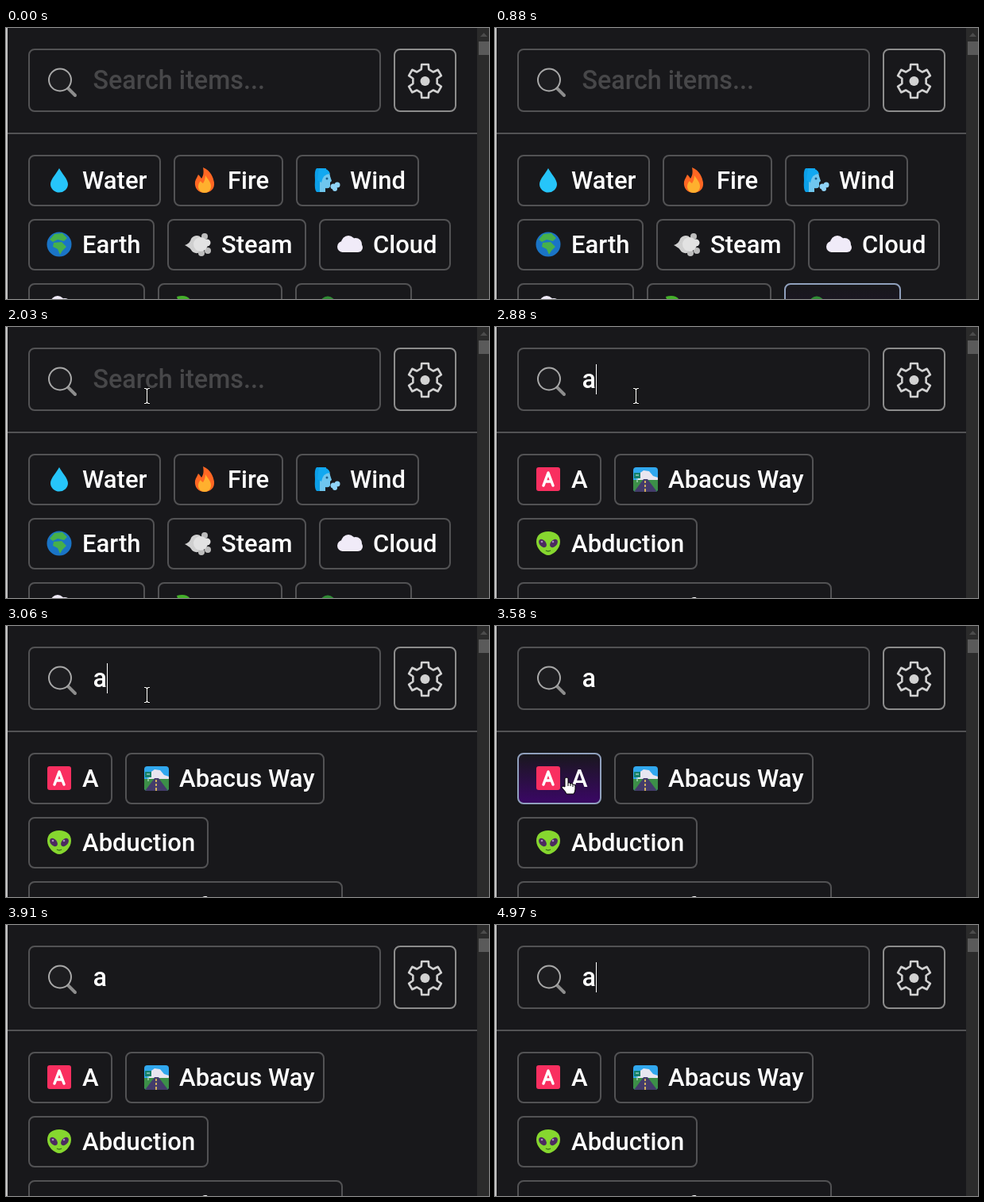
These frames come from a looping animation (608 by 342 pixels, 5000 ms). An HTML page with a canvas:

```html
<!DOCTYPE html>
<html lang="en">
<head>
<meta charset="utf-8">
<title>Item search</title>
<style>
  html, body { margin: 0; width: 100%; height: 100%; overflow: hidden; background: #18181b; }
  canvas { display: block; }
</style>
</head>
<body>
<canvas id="stage" width="608" height="342"></canvas>
<script>
const ctx = document.getElementById('stage').getContext('2d');
const LOOP = 5000, TYPED_AT = 2880, FADE = 150;
const BACK = '#18181b', LINE = '#525254';

function shape(d, fill, stroke, width = 1) {
  const path = new Path2D(d);
  if (fill) { ctx.fillStyle = fill; ctx.fill(path); }
  if (stroke) { ctx.strokeStyle = stroke; ctx.lineWidth = width; ctx.stroke(path); }
}

function discs(color, ...list) {
  ctx.fillStyle = color;
  for (const [x, y, rx, ry = rx, turn = 0] of list) {
    ctx.beginPath();
    ctx.ellipse(x, y, rx, ry, turn, 0, 7);
    ctx.fill();
  }
}

function frame(x, y, w, h, stroke, fill) {
  ctx.beginPath();
  ctx.roundRect(x + 1, y + 1, w - 2, h - 2, 7);
  if (fill) { ctx.fillStyle = fill; ctx.fill(); }
  ctx.strokeStyle = stroke;
  ctx.lineWidth = 2;
  ctx.stroke();
}

function label(text, x, y, color, size) {
  ctx.font = `500 ${size}px Roboto, Arial, sans-serif`;
  ctx.fillStyle = color;
  ctx.fillText(text, x, y);
}

function at(x, y, draw) {
  ctx.save();
  ctx.translate(x, y);
  draw();
  ctx.restore();
}

// Icons are drawn around their centre, about 32 px wide.
const icons = {
  water() { shape('M0-15C3-9 11-1 11 5A11 10.5 0 0 1-11 5C-11-1-3-9 0-15Z', '#26c5fa'); },
  fire() {
    shape('M-2-16C8-12 11-3 12 3C13 11 7 16 0 16C-8 16-13 10-12 2C-11-2-9-4-8-7C-6-5-5-4-4-2C-1-6-1-11-2-16Z', '#ff6723');
    shape('M1-6C3-2 8 2 8 8C8 13 4 16 0 16C-5 16-8 12-8 8C-8 5-7 3-5 1C-4 3-3 3-2 4C0 1 1-2 1-6Z', '#ffb02e');
  },
  wind() {
    shape('M-13-15H-1L-4 15H-13Q-16 13-15 0Q-16-13-13-15Z', '#0c9fe8');
    shape('M-5-11Q4-12 4-5L6 1L4 3V8Q3 11-2 10V15H-9V-2Z', '#6fc6ee');
    shape('M-10-15Q2-16 4-8Q-5-8-7 3L-12 0Z', '#12a8f0');
    discs('#1c5f8c', [0, -2, 1.5]);
    discs('#8fd3f7', [8, 8, 3.5], [13, 6, 3.5], [10, 11, 3]);
  },
  earth() {
    discs('#1a74c6', [0, 0, 15.5]);
    shape('M-6-13L4-14L10-8L6-4L-2-6L-8-3L-12-6Z', '#46b04a');
    shape('M-7-2L3-3L9 3L4 8L1 13L-2 6L-8 3Z', '#46b04a');
  },
  steam() {
    shape('M-17 1C-13 0-10-3-9-7C-6-12 1-12 3-9V9C-1 13-7 11-9 7C-11 4-14 3-17 1Z', '#d0d0d0');
    discs('#bdbdbd', [8, -10, 4], [12, 8, 4], [4, 11, 4]);
    discs('#e2e2e2', [3, 0, 9], [11, -2, 4.5]);
  },
  cloud() {
    discs('#f0ebf8', [-9, 3, 7], [-2, -2, 9], [7, 0, 8], [10, 4, 6]);
    ctx.fillRect(-10, 4, 20, 6);
  },
  rain() { at(0, -5, icons.cloud); },
  plant() { shape('M-15-15Q1-19 4-6Q-12-2-15-15Z', '#44b02a'); },
  tree() { discs('#2f8a33', [2, -6, 9.5], [-5, 0, 9], [7, 0, 9]); },
  letter() {
    ctx.fillStyle = '#f92f60';
    ctx.beginPath();
    ctx.roundRect(-15, -15, 30, 30, 3);
    ctx.fill();
    ctx.lineCap = ctx.lineJoin = 'round';
    shape('M-6 8L0-8L6 8M-4 3H4', null, '#fff', 3.5);
  },
  road() {
    ctx.beginPath();
    ctx.roundRect(-15, -15, 31, 31, 4);
    ctx.clip();
    shape('M-15-15H16V16H-15Z', '#31a8ee');
    shape('M-9 1V-6L-2-11L5-10L10-4L16-2V4H-15Z', '#e8e6f0');
    shape('M-15 1H16V16H-15Z', '#3c8f48');
    shape('M-2 0H3L15 16H-14Z', '#433b6b');
    shape('M0 2V5M0 7V10M0 12V16', null, '#ffd45a', 1.5);
    shape('M-14-8H-6V-1H-14Z', '#14806a');
    shape('M-12-5H-8M-10-1V4', null, '#d7efe4');
  },
  alien() {
    shape('M0-15C9-15 15-10 15-2C15 7 6 15 0 15C-6 15-15 7-15-2C-15-10-9-15 0-15Z', '#86d72f');
    discs('#4b2a60', [-7, 0, 4, 6, -.7], [7, 0, 4, 6, .7]);
    discs('#a98bc0', [-8, -2, 1.3], [6, -2, 1.3]);
    shape('M-3 9Q0 11 3 9', null, '#3a6b1c', 1.5);
  },
  none() {}
};

const chip = (text, icon, x, y, w) => ({ text, icon, x, y, w, h: 65 });
const allItems = [
  chip('Water', 'water', 28, 160, 167),
  chip('Fire', 'fire', 211, 160, 138),
  chip('Wind', 'wind', 365, 160, 155),
  chip('Earth', 'earth', 28, 241, 159),
  chip('Steam', 'steam', 203, 241, 175),
  chip('Cloud', 'cloud', 394, 241, 166),
  chip('Rain', 'rain', 28, 322, 147),
  chip('Plant', 'plant', 191, 322, 157),
  chip('Tree', 'tree', 364, 322, 147)
];
const foundItems = [
  chip('A', 'letter', 28, 160, 106),
  chip('Abacus Way', 'road', 150, 160, 251),
  chip('Abduction', 'alien', 28, 241, 227),
  chip('Absence of Everything', 'none', 28, 322, 396)
];
const searchBox = { x: 28, y: 26, w: 444, h: 80 };

// Pointer path: time, x, y
const path = [
  [845, 437, 350], [1390, 177, 87], [3120, 177, 87], [3400, 132, 152],
  [3580, 90, 191], [3700, 38, 223], [3760, 18, 245], [3850, -20, 285]
];

function pointer(t) {
  const i = path.findIndex(p => p[0] > t);
  if (i < 1) return null;
  const [t0, x0, y0] = path[i - 1], [t1, x1, y1] = path[i];
  let k = (t - t0) / (t1 - t0);
  if (i === 1) k = k * k * (3 - 2 * k);
  return { x: x0 + (x1 - x0) * k, y: y0 + (y1 - y0) * k };
}

const inside = (p, b) => p && p.x >= b.x && p.x < b.x + b.w && p.y >= b.y && p.y < b.y + b.h;

// A linear transition equals the share of the last FADE ms spent hovering.
function glow(item, t) {
  let hits = 0;
  for (let back = 0; back < FADE; back += 10) hits += inside(pointer(t - back), item) ? 1 : 0;
  return hits * 10 / FADE;
}

function drawChip(item, t) {
  const { x, y, w, h, text, icon } = item;
  const level = glow(item, t);
  let fill = BACK;
  if (level) {
    fill = ctx.createLinearGradient(0, y, 0, y + h);
    fill.addColorStop(0, 'rgba(56,8,96,0)');
    fill.addColorStop(.9, `rgba(56,8,96,${level})`);
  }
  frame(x, y, w, h, inside(pointer(t), item) ? '#90a0bd' : LINE, fill);
  at(x + 39, y + 32, icons[icon]);
  label(text, x + 68, y + 43, '#fff', 31);
}

function drawGear() {
  let d = '';
  for (let i = 0; i < 6; i++) {
    for (const [offset, r] of [[-.31, 15.5], [-.2, 21.5], [.2, 21.5], [.31, 15.5]]) {
      const a = i * Math.PI / 3 - Math.PI / 2 + offset;
      d += `${d ? 'L' : 'M'}${r * Math.cos(a)} ${r * Math.sin(a)}`;
    }
  }
  ctx.lineJoin = 'round';
  shape(d + 'Z', null, '#d2d2d2', 2.6);
  discs('#d2d2d2', [0, 0, 6]);
}

function drawMagnifier() {
  ctx.lineCap = 'round';
  shape('M78 76L87 85', null, '#8d8d8d', 4);
  shape('M54 65.5a14 14 0 1 0 28 0a14 14 0 1 0-28 0', '#1d1d20', '#a8a8a8', 2);
}

function drawCursor(p, items) {
  at(Math.round(p.x), Math.round(p.y), () => {
    ctx.lineJoin = 'round';
    if (inside(p, searchBox)) {
      const beam = 'M-3-9.5H-1L.5-8L2-9.5H4M.5-8V8M-3 9.5H-1L.5 8L2 9.5H4';
      shape(beam, null, '#000', 3);
      shape(beam, null, '#fff', 1.2);
    } else if (items.some(item => inside(p, item))) {
      shape('M-2 1Q0-1 2 1V7Q4 6 5 8Q7 7 8 9Q11 8 11 11V15Q11 18 9 21H0Q-1 18-6 13Q-6 10-2 12Z', '#fff', '#000');
      shape('M2 7V11M5 8V11M8 9V12', null, '#000');
    } else {
      shape('M0 0V17L4 13L7 20L10 19L7 12H12Z', '#fff', '#000');
    }
  });
}

function drawCaret(t, typed) {
  const since = t - (typed ? TYPED_AT : 1500);
  const on = typed ? Math.floor(since / 517) % 2 === 0 : since >= 0 && since < 530;
  if (!on) return;
  ctx.fillStyle = '#fff';
  ctx.fillRect(typed ? 127 : 110, 47, 1, 38);
}

function draw(t) {
  const typed = t >= TYPED_AT;
  const items = typed ? foundItems : allItems;
  ctx.fillStyle = BACK;
  ctx.fillRect(0, 0, 608, 342);
  items.forEach(item => drawChip(item, t));

  ctx.fillStyle = LINE;
  ctx.fillRect(2, 132, 591, 2);
  frame(searchBox.x, searchBox.y, searchBox.w, searchBox.h, LINE);
  frame(488, 26, 79, 80, '#8c8c8c');
  at(527.5, 67, drawGear);
  at(0, 0, drawMagnifier);
  label(typed ? 'a' : 'Search items...', 109.5, 77, typed ? '#fff' : '#474749', 32.3);
  drawCaret(t, typed);

  ctx.fillStyle = '#c4c4c4';
  ctx.fillRect(0, 0, 2, 342);
  ctx.fillStyle = '#2b2b2b';
  ctx.fillRect(593, 0, 15, 342);
  ctx.fillStyle = '#5a5a5a';
  ctx.fillRect(595, 17, 13, 17);
  shape('M597 11L601.5 6L606 11Z', '#4c4c4c');

  const p = pointer(t);
  if (p) drawCursor(p, items);
}

function tick() {
  draw(performance.now() % LOOP);
  requestAnimationFrame(tick);
}
tick();
</script>
</body>
</html>
```
